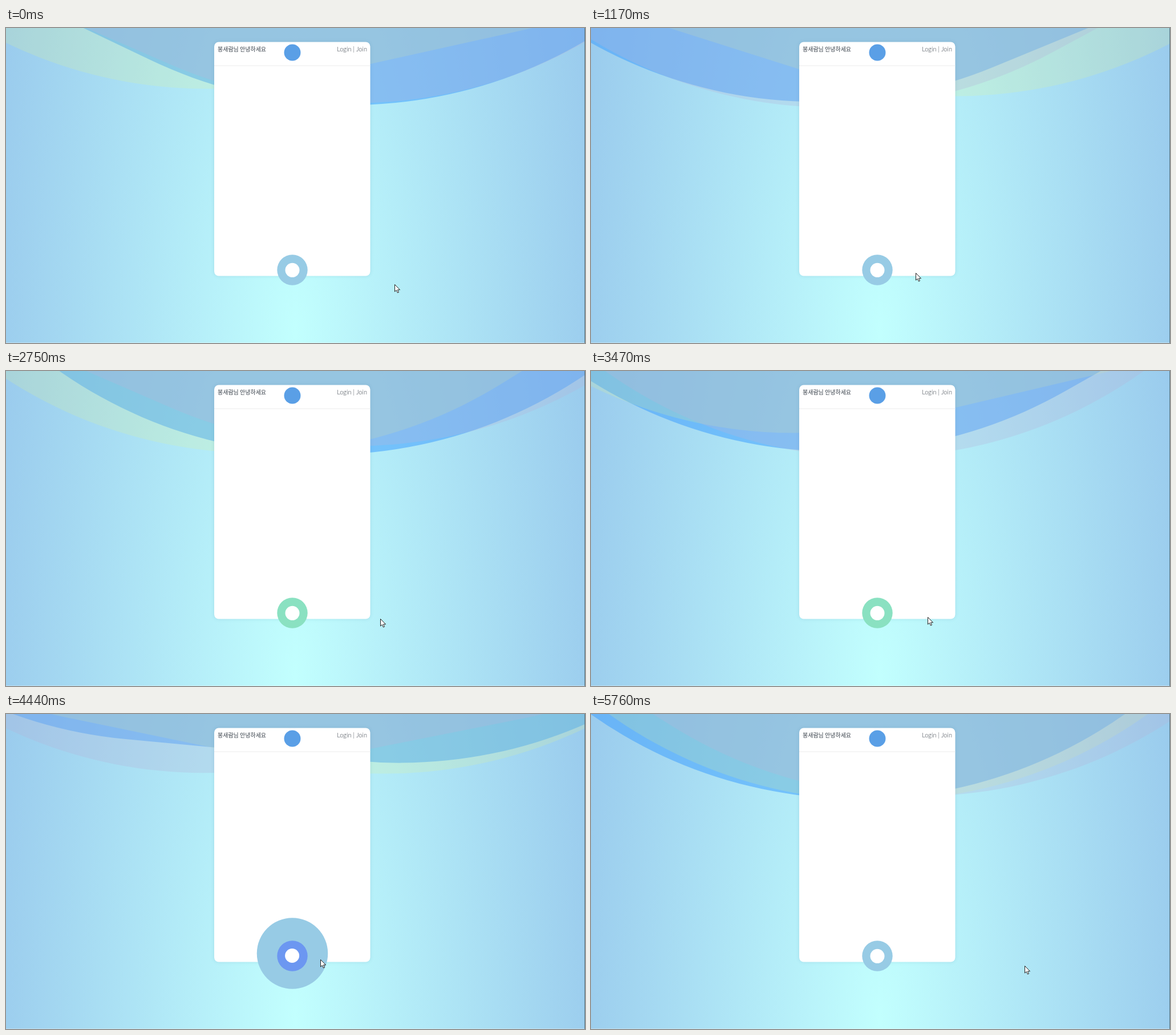
Write an HTML page with a canvas that moves like this. It is 1015 px wide and 552 px high and loops after 5810 ms.

```html
<!DOCTYPE html>
<html lang="ko">
<head>
<meta charset="utf-8">
<title>Waves</title>
<style>
  html, body { margin: 0; width: 100%; height: 100%; overflow: hidden; background: #b4edf8; }
  canvas { display: block; width: 1015px; height: 552px; }
</style>
</head>
<body>
<canvas id="stage" width="1015" height="552"></canvas>
<script>
const ctx = document.getElementById('stage').getContext('2d');
const W = 1015, H = 552, LOOP = 5810;

// Large rounded squares turning above the stage
const HALF = 1015, CENTER = { x: 507, y: -947.5 };
const waves = [
  { color: 'rgba(64,160,255,.55)', start: -19.5, period: 10000 },
  { color: 'rgba(225,246,140,.2)', start: 32.5, period: 14000 },
  { color: 'rgba(178,180,215,.3)', start: -21.6, period: 11000 }
];

// Pointer path: time, x, y
const path = [
  [620, 681, 449], [900, 636, 439], [1170, 569, 429], [1720, 526, 428],
  [2040, 513, 428], [2330, 516, 428], [2500, 575, 431], [2750, 656, 434],
  [3000, 664, 434], [3250, 650, 433], [3700, 527, 428], [4080, 521, 429],
  [4390, 525, 429], [4850, 760, 441]
];

// Hover spans and the clicks that toggle the button colour
const hovers = [[1710, 2372], [3710, 4410]];
const clicks = [2150, 4150];
const BLUE = [151, 203, 229], GREEN = [138, 225, 193], INDIGO = [96, 136, 244];

const clamp = v => Math.min(1, Math.max(0, v));
const ease = p => 1 - Math.pow(1 - clamp(p), 2.3);
const mix = (a, b, p) => a + (b - a) * p;
const mixColor = (a, b, p) => `rgb(${a.map((v, i) => Math.round(mix(v, b[i], p)))})`;

function disc(x, y, r, color) {
  ctx.fillStyle = color;
  ctx.beginPath();
  ctx.arc(x, y, r, 0, Math.PI * 2);
  ctx.fill();
}

function drawBackground() {
  ctx.save();
  ctx.translate(507, 530);
  ctx.scale(540, 1600);
  const g = ctx.createRadialGradient(0, 0, 0, 0, 0, 1);
  g.addColorStop(0, '#c2fffe');
  g.addColorStop(1, '#9acbed');
  ctx.fillStyle = g;
  ctx.fillRect(-1, -1, 2, 2);
  ctx.restore();
}

function drawWaves(t) {
  for (const w of waves) {
    ctx.save();
    ctx.translate(CENTER.x, CENTER.y);
    ctx.rotate((w.start + 45 + 360 * t / w.period) * Math.PI / 180);
    ctx.fillStyle = w.color;
    ctx.beginPath();
    ctx.roundRect(-HALF, -HALF, HALF * 2, HALF * 2, HALF * 0.8);
    ctx.fill();
    ctx.restore();
  }
}

function drawCard() {
  ctx.save();
  ctx.shadowColor = 'rgba(60,120,150,.16)';
  ctx.shadowBlur = 6;
  ctx.fillStyle = '#fff';
  ctx.beginPath();
  ctx.roundRect(365, 24.5, 273.5, 410, 8);
  ctx.fill();
  ctx.restore();

  ctx.fillStyle = '#ececec';
  ctx.fillRect(365, 65.5, 273.5, 1);
  disc(502, 43, 14.5, '#5a9fe6');

  ctx.fillStyle = '#38404a';
  ctx.font = '300 10px "Noto Sans CJK KR", "Noto Sans CJK", sans-serif';
  ctx.textAlign = 'left';
  ctx.fillText('봉새람님 안녕하세요', 371, 41);
  ctx.font = '300 11px Lato, sans-serif';
  ctx.textAlign = 'right';
  ctx.fillText('Login | Join', 633, 41);
}

function hoverAmount(t) {
  for (const [on, off] of hovers) {
    if (t >= on && t < off) return ease((t - on) / 300);
    if (t >= off && t < off + 300) return 1 - ease((t - off) / 300);
  }
  return 0;
}

function drawButton(t) {
  const p = hoverAmount(t);
  const base = t > clicks[0] && t < clicks[1] ? GREEN : BLUE;
  if (p > 0) disc(502, 419.5, 80 * p, mixColor(BLUE, BLUE, 0));
  disc(502, 424, 26.7, mixColor(base, INDIGO, p));
  disc(502 - 0.5 * p, 424.3 - p, 12.5, '#fff');
}

function pointerAt(t) {
  const next = path.findIndex(k => k[0] > t);
  if (next === 0) return path[0].slice(1);
  if (next < 0) return path[path.length - 1].slice(1);
  const a = path[next - 1], b = path[next];
  const p = (t - a[0]) / (b[0] - a[0]);
  return [Math.round(mix(a[1], b[1], p)), Math.round(mix(a[2], b[2], p))];
}

const arrow = new Path2D('M.5 .5V13L3.4 10.4L5.4 15L7.5 14.1L5.5 9.8H9.6Z');
const hand = new Path2D('M-1.5 9V1Q-1.5 -.5 0 -.5Q1.5 -.5 1.5 1V5Q3 4.3 3.9 5.6' +
  'Q5.3 5 6 6.4Q8 6 8 8V11Q8 13 6.8 14.2V16H-.6V14.6L-4.6 9.6Q-5 8 -3.4 7.8Z');

function drawPointer(t) {
  const [x, y] = pointerAt(t);
  const over = Math.hypot(x - 502, y - 424) < 27;
  const shape = over ? hand : arrow;
  ctx.save();
  ctx.translate(x, y);
  ctx.lineJoin = 'round';
  ctx.lineWidth = over ? 0.8 : 1;
  ctx.strokeStyle = over ? '#34405c' : '#222';
  ctx.fillStyle = '#fff';
  ctx.fill(shape);
  ctx.stroke(shape);
  if (over) {
    ctx.beginPath();
    for (const fx of [1.5, 3.9, 6]) {
      ctx.moveTo(fx, 5.8);
      ctx.lineTo(fx, 8.5);
    }
    ctx.stroke();
  }
  ctx.restore();
}

function draw(t) {
  drawBackground();
  drawWaves(t);
  drawCard();
  drawButton(t);
  drawPointer(t);
  ctx.fillStyle = 'rgba(255,255,255,.3)';
  ctx.fillRect(0, H - 1, W, 1);
  ctx.fillStyle = '#567888';
  ctx.fillRect(W - 1, 0, 1, H);
}

const begin = performance.now();
function frame() {
  draw((performance.now() - begin) % LOOP);
  requestAnimationFrame(frame);
}
frame();
</script>
</body>
</html>
```
